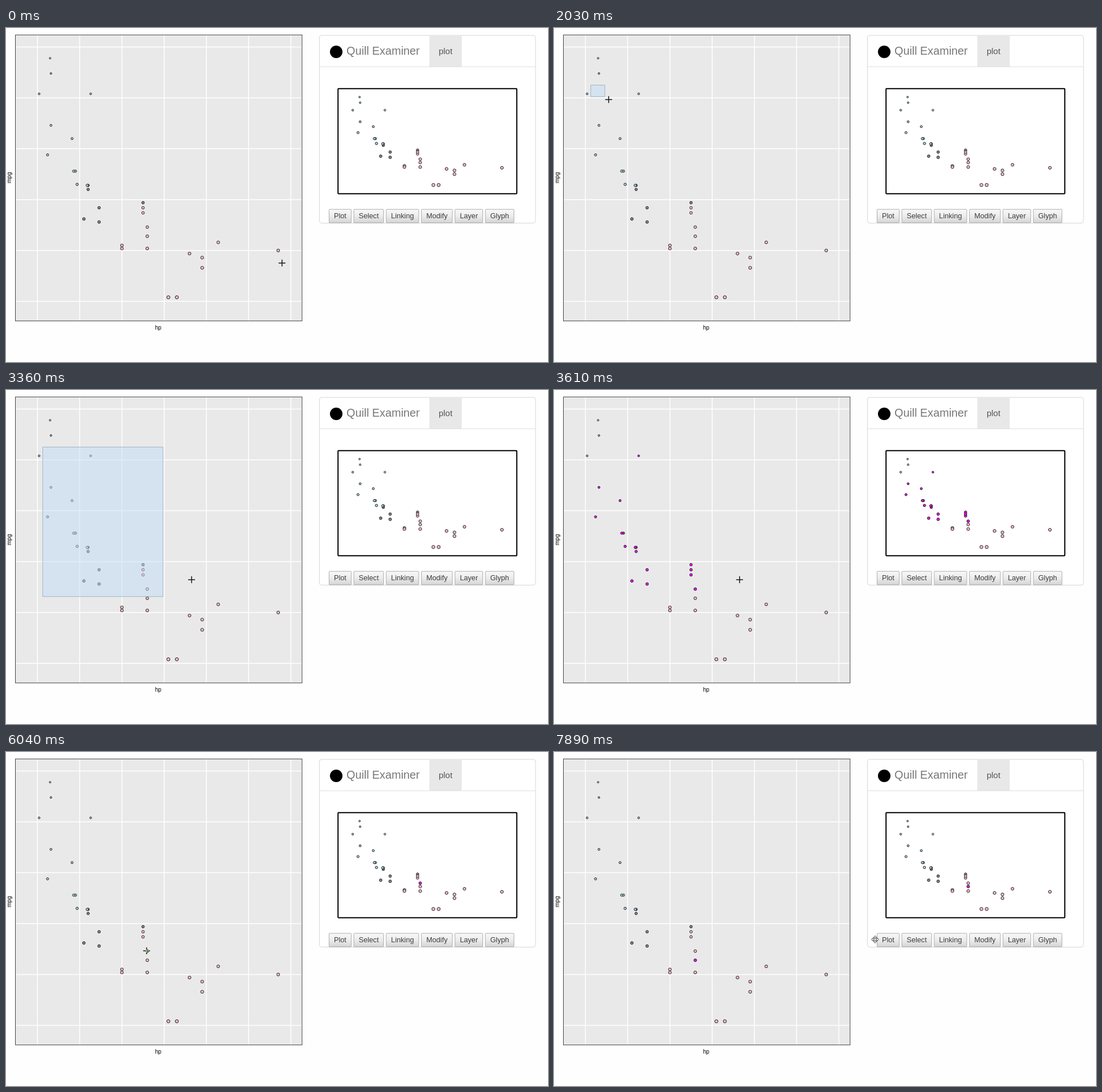
Recreate the animation shown at these times as an HTML page. Size 952 px wide and 588 px high, loop 8000 ms.

```html
<!DOCTYPE html>
<html lang="en">
<head>
<meta charset="utf-8">
<title>Linked scatterplot</title>
<style>
  html, body { margin: 0; width: 100%; height: 100%; overflow: hidden; background: #fff; }
  svg { display: block; font-family: "Liberation Sans", Arial, sans-serif; }
</style>
</head>
<body>
<svg id="stage" width="952" height="588" viewBox="0 0 952 588">
  <defs>
    <linearGradient id="face" x2="0" y2="1">
      <stop offset="0" stop-color="#f8f8f8"/>
      <stop offset=".5" stop-color="#ececec"/>
      <stop offset="1" stop-color="#d4d4d4"/>
    </linearGradient>
  </defs>
  <rect width="952" height="588" fill="#fefefe"/>
  <rect x="16.5" y="12.2" width="503.5" height="503.5" fill="#e9e9e9"/>
  <g id="grid" stroke="#fff" stroke-width="1.5"></g>
  <rect x="16.5" y="12.2" width="503.5" height="503.5" fill="none" stroke="#444"/>
  <text x="267.3" y="531" font-size="10" text-anchor="middle">hp</text>
  <text transform="translate(9 263.5) rotate(-90)" font-size="10" text-anchor="middle">mpg</text>

  <rect x="550.5" y="13" width="379.5" height="330.5" rx="4" fill="#fff" stroke="#d6d6d6"/>
  <rect x="743.5" y="13.5" width="57" height="54.5" fill="#e8e8e8"/>
  <path d="M551 68.2H930" stroke="#ddd"/>
  <circle cx="580" cy="42" r="11"/>
  <text x="598" y="47" font-size="19.8" fill="#777">Quill Examiner</text>
  <text x="772" y="46" font-size="15" fill="#555" text-anchor="middle">plot</text>
  <rect x="583.2" y="106.8" width="314" height="185" rx="1" fill="#fff" stroke="#000" stroke-width="2"/>
  <g id="buttons" font-size="12.7" fill="#3c3c3c" text-anchor="middle"></g>

  <g id="points" stroke="#111" stroke-width=".95"></g>
  <rect id="brush" x="64.5" y="100.5" fill="rgba(193,221,247,.5)" stroke="#9fb5c9"/>
  <path id="cross" d="M-6 0H6M0 -6V6" stroke="#fff" stroke-width="1.5" style="mix-blend-mode:difference"/>
  <path id="move" d="M0 -6.5L2.8 -3.4H1V-1H3.4V-2.8L6.5 0L3.4 2.8V1H1V3.4H2.8L0 6.5L-2.8 3.4H-1V1H-3.4V2.8L-6.5 0L-3.4 -2.8V-1H-1V-3.4H-2.8Z"
    fill="#fff" stroke="#333" stroke-width=".9"/>
</svg>
<script>
const LOOP = 8000;
const FIRST_TICK = 535, TICK = 133.5;
const BRUSH_ON = 11, BRUSH_DONE = 18, RELEASE = 23, BRUSH_LAG = .22;
const CLICKS = [41, 49];
const $ = id => document.getElementById(id);

function add(parent, tag, attrs, text) {
  const el = document.createElementNS('http://www.w3.org/2000/svg', tag);
  for (const k in attrs) el.setAttribute(k, attrs[k]);
  if (text) el.textContent = text;
  return parent.appendChild(el);
}

// mpg values by hp
const mpgByHp = {
  52: [30.4], 62: [24.4], 65: [33.9], 66: [32.4, 27.3], 91: [26], 93: [22.8], 95: [22.8],
  97: [21.5], 105: [18.1], 109: [21.4], 110: [21, 21.4], 113: [30.4], 123: [19.2, 17.8],
  150: [15.5, 15.2], 175: [19.7, 18.7, 19.2], 180: [16.4, 17.3, 15.2], 205: [10.4],
  215: [10.4], 230: [14.7], 245: [14.3, 13.3], 264: [15.8], 335: [15]
};

// cursor glides: from tick, to tick, x, y, ease-out power
const glides = [
  [-1, 0, 442, 412], [0, 3, 155, 247], [3, 9, 65, 102, 2],
  [10, 11, 96, 126], [11, 15, 234, 299], [15, 18, 276, 364, 2], [18, 20, 284, 353], [20, 21, 326, 334],
  [27, 28, 289, 360], [28, 31, 248, 353, 2], [32, 33, 247, 350], [43, 44, 248, 366], [51, 55, 564, 330]
];

function cursorAt(tick) {
  let x = 484.8, y = 413.8;
  for (const [from, to, toX, toY, power = 1] of glides) {
    if (tick <= from) break;
    const rest = 1 - Math.min(1, (tick - from) / (to - from));
    const eased = 1 - rest ** power;
    x += (toX - x) * eased;
    y += (toY - y) * eased;
  }
  return [x, y];
}

const brushCorner = tick => cursorAt(Math.min(tick, BRUSH_DONE) - BRUSH_LAG);

const mainX = hp => 1.484 * hp - 19;
const mainY = mpg => 53.2 + (33.9 - mpg) * 17.91;
const miniX = hp => .9258 * hp + 560.9;
const miniY = mpg => 121.6 + (33.9 - mpg) * 6.587;

function carColor(hp, mpg) {
  if (mpg > 25 || mpg > 20 && hp < 110) return '#add8e6';
  return hp >= 150 && mpg < 19.5 ? '#ffc0cb' : '#8c8c8c';
}

for (let hp = 50; hp <= 350; hp += 50) add($('grid'), 'path', {d: `M${mainX(hp)} 13V515`});
for (let mpg = 10; mpg <= 35; mpg += 5) add($('grid'), 'path', {d: `M17 ${mainY(mpg)}H519.5`});

let left = 567.5;
for (const label of ['Plot', 'Select', 'Linking', 'Modify', 'Layer', 'Glyph']) {
  const box = add($('buttons'), 'rect', {x: left, y: 319.2, height: 23.8, rx: 1, fill: 'url(#face)', stroke: '#adadad'});
  const text = add($('buttons'), 'text', {y: 335}, label);
  const width = text.getComputedTextLength() + 17;
  box.setAttribute('width', width);
  text.setAttribute('x', left + width / 2);
  left += width + 4.6;
}

const [boxRight, boxBottom] = brushCorner(BRUSH_DONE);
const cars = Object.keys(mpgByHp).map(Number).reverse().flatMap(hp => mpgByHp[hp].map(mpg => {
  const x = mainX(hp), y = mainY(mpg), r = 3.4 - .057 * mpg;
  return {
    x, y,
    color: carColor(hp, mpg),
    boxed: x > 64.5 && x < boxRight && y > 100.5 && y < boxBottom,
    dots: [[x, y], [miniX(hp), miniY(mpg)]].map(([cx, cy]) => add($('points'), 'circle', {cx, cy, r}))
  };
}));

function isSelected(car, tick) {
  const click = CLICKS.filter(c => c <= tick).pop();
  if (!click) return tick >= RELEASE && car.boxed;
  const [x, y] = cursorAt(click);
  return Math.hypot(car.x - x, car.y - y) < 5;
}

const show = (el, on) => el.setAttribute('visibility', on ? 'visible' : 'hidden');

function draw(t) {
  const tick = Math.floor((t - FIRST_TICK) / TICK);

  for (const car of cars) {
    const fill = isSelected(car, tick) ? '#f0f' : car.color;
    for (const dot of car.dots) dot.setAttribute('fill', fill);
  }

  const brushing = tick >= BRUSH_ON && tick < RELEASE;
  show($('brush'), brushing);
  if (brushing) {
    const [right, bottom] = brushCorner(tick);
    $('brush').setAttribute('width', right - 64.5);
    $('brush').setAttribute('height', bottom - 100.5);
  }

  const [x, y] = cursorAt(tick);
  const inPlot = x <= 520;
  show($('cross'), inPlot);
  show($('move'), !inPlot);
  (inPlot ? $('cross') : $('move')).setAttribute('transform', `translate(${x} ${y})`);
}

const start = performance.now();
function frame() {
  draw((performance.now() - start) % LOOP);
  requestAnimationFrame(frame);
}
frame();
</script>
</body>
</html>
```
